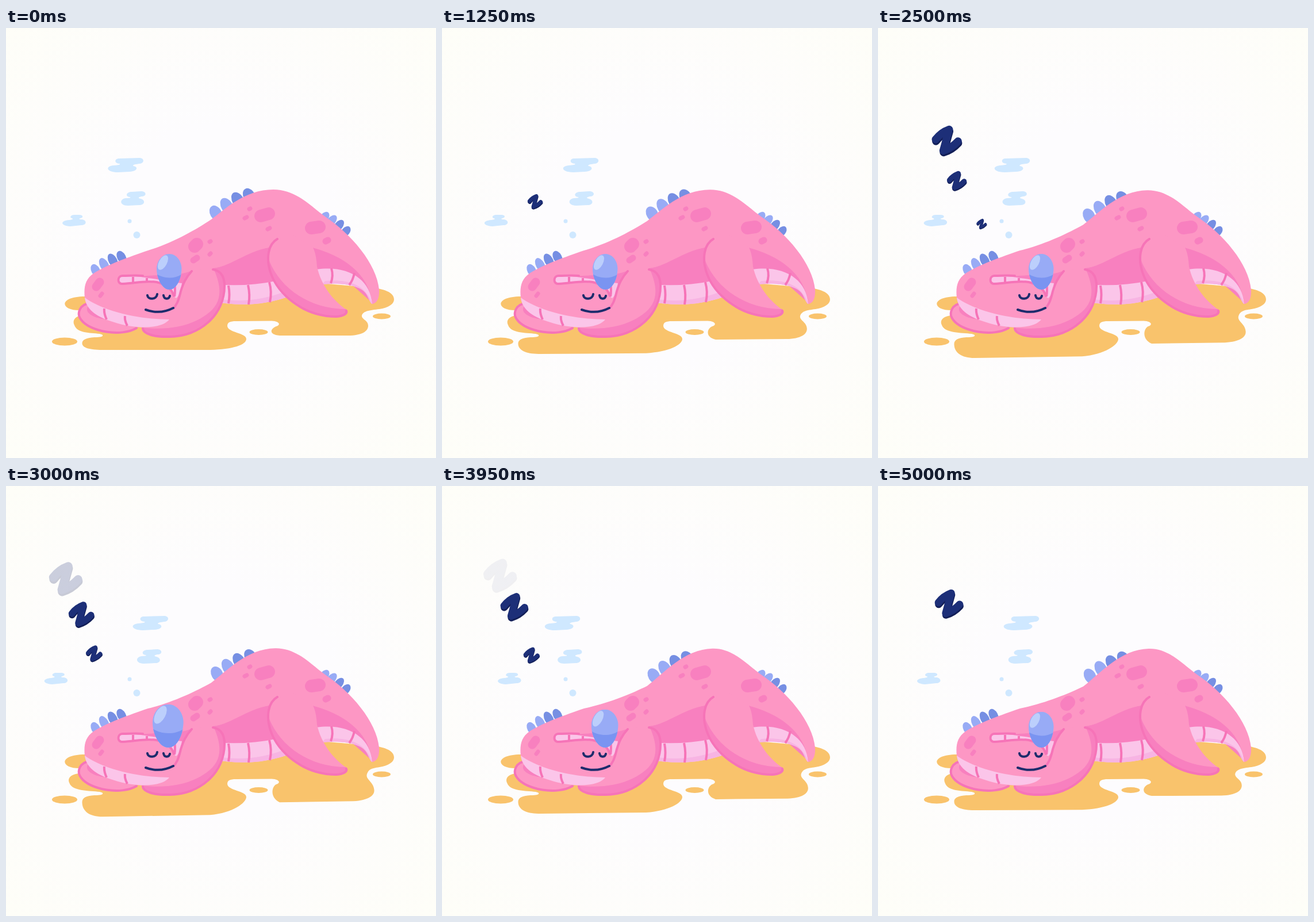
An HTML page that plays this animation: 748 by 748 pixels, repeating every 5.05 s.

```html
<!DOCTYPE html>
<html lang="en">
<head>
<meta charset="utf-8">
<title>Sleeping dragon</title>
<style>
html, body { margin: 0; width: 100%; height: 100%; overflow: hidden; background: #fdfdfc; }
svg { display: block; width: 100%; height: 100%; }
.cloud { fill: #cfe8ff; }
.sand { fill: #f9c36c; }
.skin { fill: #fd97c4; }
.shade { fill: #f880bf; }
.belly { fill: #fbc5e9; }
.fold { fill: #f7b4e3; }
.line { fill: none; stroke: #f674b8; stroke-width: 4; stroke-linecap: round; stroke-linejoin: round; }
.stripe { fill: none; stroke: #f674b8; stroke-width: 4; }
.spots { fill: none; stroke: #f880bf; stroke-linecap: round; }
.face { fill: none; stroke: #1c2c6c; stroke-width: 4; stroke-linecap: round; }
.z { fill: none; stroke-width: 13; stroke-linecap: round; stroke-linejoin: round; }
</style>
</head>
<body>
<svg viewBox="0 0 748 748">
  <defs>
    <radialGradient id="sky" cx=".5" cy=".5" r=".75">
      <stop offset=".35" stop-color="#fdfcfe"/>
      <stop offset="1" stop-color="#fefef7"/>
    </radialGradient>
    <clipPath id="bubbleClip"><path d="M284 393C297 393 305.500 406 305.500 419C305 436 297 455 284 455C272 455 262 436 262 419C262 406 271 393 284 393Z"/></clipPath>
    <path id="zed" d="M-19-1Q-10-13 4-18L-6 18Q8 14 19 2"/>
  </defs>
  <rect width="748" height="748" fill="url(#sky)"/>

  <g class="cloud">
    <path id="cloudTop" d="M197 227L232 226C241 226 241 235 233 236C226 237 221 237 221 240C230 241 230 249 215 250L195 251C174 251 172 240 188 239C196 238 199 238 198 236C188 236 188 227 197 227Z"/>
    <path id="cloudMid" d="M219 285L235 284C245 284 245 293 236 293C230 294 229 296 234 297C243 299 242 308 232 308L212 309C197 309 197 297 209 296C216 296 218 295 215 294C207 293 209 285 219 285Z"/>
    <path id="cloudLow" d="M119 325L127 325C135 325 135 330 129 331C126 332 128 333 132 333C141 334 141 343 131 343L112 345C94 344 94 335 110 334C117 333 117 332 115 331C110 330 112 325 119 325Z"/>
    <circle cx="227.5" cy="360" r="6"/>
    <circle cx="215" cy="336" r="3.5"/>
  </g>

  <g class="sand">
    <path id="puddle"/>
    <ellipse cx="102" cy="545.5" rx="22" ry="7"/>
    <ellipse cx="439.5" cy="529" rx="16" ry="5"/>
    <ellipse cx="653.5" cy="501.5" rx="15.5" ry="5"/>
  </g>

  <g id="zs"></g>

  <!-- far hand -->
  <path class="skin" d="M146 479C128 480 122 497 131 508C146 528 200 538 227 522L190 490Z"/>
  <path class="shade" d="M143 484C136 492 146 505 178 507L215 514L190 490Z"/>
  <path class="line" d="M146 479C128 480 122 497 131 508C146 528 200 538 227 522"/>

  <g id="headSpikes"></g>
  <g id="backSpikes"></g>
  <g id="tailSpikes"></g>
  <path id="body" class="skin"/>
  <g class="spots">
    <path stroke-width="22" d="M328 380l4-4M443 327l14-4M531 348l14-2"/>
    <path stroke-width="15" d="M157 450l6-8"/>
    <path stroke-width="11" d="M326 404l6-4M556 371l4-2"/>
    <path stroke-width="7" d="M164 466l3-4M187 469l2-3M354 394l2-2M354 372l2-1M415 331l4-2M455 350l4-2M423 315l2-1"/>
  </g>

  <!-- belly -->
  <path class="shade" d="M360 418C395 414 420 385 470 380L500 455L380 455Z"/>
  <path class="belly" d="M365 446C400 449 435 447 470 440L494 466C450 483 405 484 360 476Z"/>
  <path class="fold" d="M370 471C410 478 450 472 484 459L494 466C450 483 405 484 360 476Z"/>
  <path class="stripe" d="M387 448Q390 464 387 479M421 447Q425 464 422 481M458 442Q463 459 459 477"/>

  <!-- tail -->
  <path class="shade" d="M533 382C585 396 630 425 637 478L600 445L540 425Z"/>
  <path class="belly" d="M540 420C595 412 634 437 637 480C629 474 632 460 613 452C595 444 570 444 545 446Z"/>
  <path class="fold" d="M555 440C590 437 625 443 637 480C629 474 632 460 613 452C595 444 570 444 550 446Z"/>
  <path class="stripe" d="M566 418Q570 431 565 444M606 426Q604 438 597 447"/>

  <!-- hind leg -->
  <path class="skin" d="M472 367C456 376 452 400 460 425C473 463 517 502 575 502C590 501 596 496 592 490C570 475 548 448 541 415C540 400 538 390 534 382L500 360Z"/>
  <path class="shade" d="M458 405C476 450 525 489 592 489C596 496 590 501 575 502C517 502 473 463 460 425Z"/>
  <path class="line" d="M472 367C456 376 452 400 460 425C473 463 517 502 575 502C587 501 594 497 592 492"/>

  <!-- neck fold -->
  <path class="shade" d="M235 432C260 428 300 434 325 421L306 447L240 440Z"/>
  <path class="belly" d="M203 431C230 430 275 440 306 444C304 456 303 464 296 470L270 450L203 446C193 446 193 431 203 431Z"/>
  <path class="stripe" d="M221 433V442M245 435V441M293 443Q295 456 293 467"/>

  <!-- front arm -->
  <path class="skin" d="M325 421C312 435 308 445 304 458C300 475 297 484 288 492C265 505 235 515 236 524C237 533 262 538 285 538C335 537 385 500 380 445C379 428 372 421 360 419Z"/>
  <path class="shade" d="M362 421C377 455 375 480 348 499C318 521 275 526 236 521C237 533 262 538 285 538C335 537 385 500 380 445C379 428 372 421 360 419Z"/>
  <path class="line" d="M323 423C312 435 308 445 304 458C300 475 297 482 290 489M360 420C372 422 379 430 380 445C382 500 335 537 285 537C258 538 239 532 238 523"/>

  <!-- head -->
  <path class="skin" d="M203 445C225 444 240 439 262 442C280 446 290 457 292 470L292 490C291 498 288 503 283 508C250 522 200 515 150 480Z"/>
  <path class="line" d="M238 431C225 430 215 431 203 431C193 431 193 446 203 445C225 444 240 439 262 442C280 446 289 456 292 466"/>
  <path class="belly" d="M137 469C165 490 225 507 284 507C272 523 230 524 195 514C160 504 140 492 137 469Z"/>
  <path class="stripe" d="M171 488Q170 496 175 507M207 501Q206 509 211 518"/>
  <path class="face" d="M246 465C247 473 262 473 263 463M274 465C275 472 283 473 285 466M243 490Q268 499 291 487"/>

  <g id="bubble" clip-path="url(#bubbleClip)">
    <rect x="255" y="388" width="56" height="72" fill="#98abf6"/>
    <path fill="#7a94f1" d="M255 422C268 437 295 439 310 425V460H255Z"/>
    <ellipse cx="273" cy="408" rx="7" ry="14" transform="rotate(28 273 408)" fill="#bccffc"/>
  </g>
</svg>
<script>
const LOOP = 5050;
const $ = id => document.getElementById(id);
const mix = (a, b, k) => a + (b - a) * k;
const clamp = k => Math.max(0, Math.min(1, k));
const pulse = (t, period) => (1 - Math.cos(2 * Math.PI * t / period)) / 2;
const zigzag = (t, period) => 1 - Math.abs(1 - 2 * (t / period % 1));
const move = (id, x, y = 0) => $(id).setAttribute("transform", `translate(${x} ${y})`);

// Four petals between two points, light then dark, largest in the middle.
function spikeRow(id, x0, y0, x1, y1, width, height, tilt) {
  for (let i = 0; i < 4; i++) {
    const k = i / 3, arch = Math.sin(Math.PI * k);
    const place = `translate(${mix(x0, x1, k)} ${mix(y0, y1, k) - 2 * arch}) rotate(${tilt})`;
    $(id).innerHTML += `<ellipse rx="${width}" ry="${height * (1 + .15 * arch)}"
      transform="${place}" fill="${i < 2 ? "#98abf5" : "#768fe3"}"/>`;
  }
}
spikeRow("headSpikes", 156, 422, 201, 399, 7.5, 12, -28);
spikeRow("backSpikes", 365, 322, 423, 292, 10, 14, -30);
spikeRow("tailSpikes", 554, 329, 591, 354, 7, 10.5, 40);

const zStarts = [0, .86, 1.64, 2.62];
$("zs").innerHTML = zStarts.map(() => `<g class="z">
  <use href="#zed" stroke="#131f58" transform="translate(.6 2.2)"/>
  <use href="#zed" stroke="#1d2f78" transform="translate(0 -1)"/></g>`).join("");

// Rises along a slowing, swaying path, growing and then fading.
function drawZ(z, age) {
  const s = age - .65;
  const x = 178.5 - 31.8 * s + 10 * Math.sin(Math.min(4.8 * s, 2 * Math.PI));
  const y = 363 - 107 * s + 9 * s * s;
  const size = Math.min(21.3 * age, 59);
  z.setAttribute("transform", `translate(${x} ${y}) scale(${size / 52})`);
  z.setAttribute("opacity", age < .5 ? 0 : clamp((3.12 - age) / .54));
}

function puddlePath(p) {
  const low = 16 * p, out = 9 * p;
  return `M140 467C92 466 92 491 128 491L140 500C${122 - out} 498 ${114 - out} 508 ${119 - out} 517
    C${124 - out} 531 145 530 163 532C172 534 170 538 154 538C138 539 132 543 132.5 ${549 + 2 * p}
    C133 ${556 + 10 * p} 145 ${560 + low} 168 ${560 + low}L355 ${560 + 13 * p}C395 ${559 + 10 * p} 418 551 418 541
    C418 530 385 530 385 518C385 512 390 510 400 510L462 509.5C475 510 479 516 470 519
    C${460 + 2 * p} 523 ${456 + 3 * p} ${533 + 10 * p} 476 ${535 + low}L${595 + 10 * p} ${535 + 14 * p}
    C${620 + 12 * p} ${535 + 12 * p} ${630 + 12 * p} ${527 + 12 * p} ${630 + 11 * p} ${518 + 11 * p}
    C${630 + 10 * p} ${508 + 8 * p} ${618 + out} ${507 + 4 * p} ${619 + out} ${500 + 3 * p}
    C${622 + out} 490 640 491 655 488C670 484 675 478 675 472C675 459 655 454 640 452L560 445L300 440Z`;
}

function bodyPath(w) {
  return `M152 427C175 412 215 398 247 387C290 ${374 + 4 * w} 330 ${351 + 11 * w} 357 ${333 + 16 * w}
    C${380 + 6 * w} ${316 + 11 * w} ${415 + 7 * w} ${281 + 3 * w} ${465 + 6 * w} ${281 + 2 * w}
    C${505 + w} ${281 + w} 530 310 555 328C600 358 645 410 649 455C650 470 645 480 636 480
    C632 475 630 462 615 452C595 444 570 444 545 446L490 468C440 484 400 482 360 474L283 508
    C265 524 225 524 190 513C160 503 140 490 137 470C135 450 138 437 152 427Z`;
}

function draw(t) {
  const drift = 46 * zigzag(t, 1.96);
  move("cloudTop", drift);
  move("cloudMid", drift * .64);
  move("cloudLow", drift * -.73);

  $("puddle").setAttribute("d", puddlePath(zigzag(t, 5.72)));

  const breath = pulse(t, 1.1);
  $("body").setAttribute("d", bodyPath(breath));
  move("backSpikes", 4 * breath, 9 * breath);

  const swell = pulse(t, 1.24);
  $("bubble").setAttribute("transform",
    `translate(292 455) scale(${1 + .25 * swell} ${1 + .226 * swell}) translate(-292 -455)`);

  [...$("zs").children].forEach((z, i) => drawZ(z, t - zStarts[i]));
}

function frame() {
  const ms = performance.now() % LOOP;
  draw(Math.floor(ms / 50) * .05);
  requestAnimationFrame(frame);
}
frame();
</script>
</body>
</html>
```
